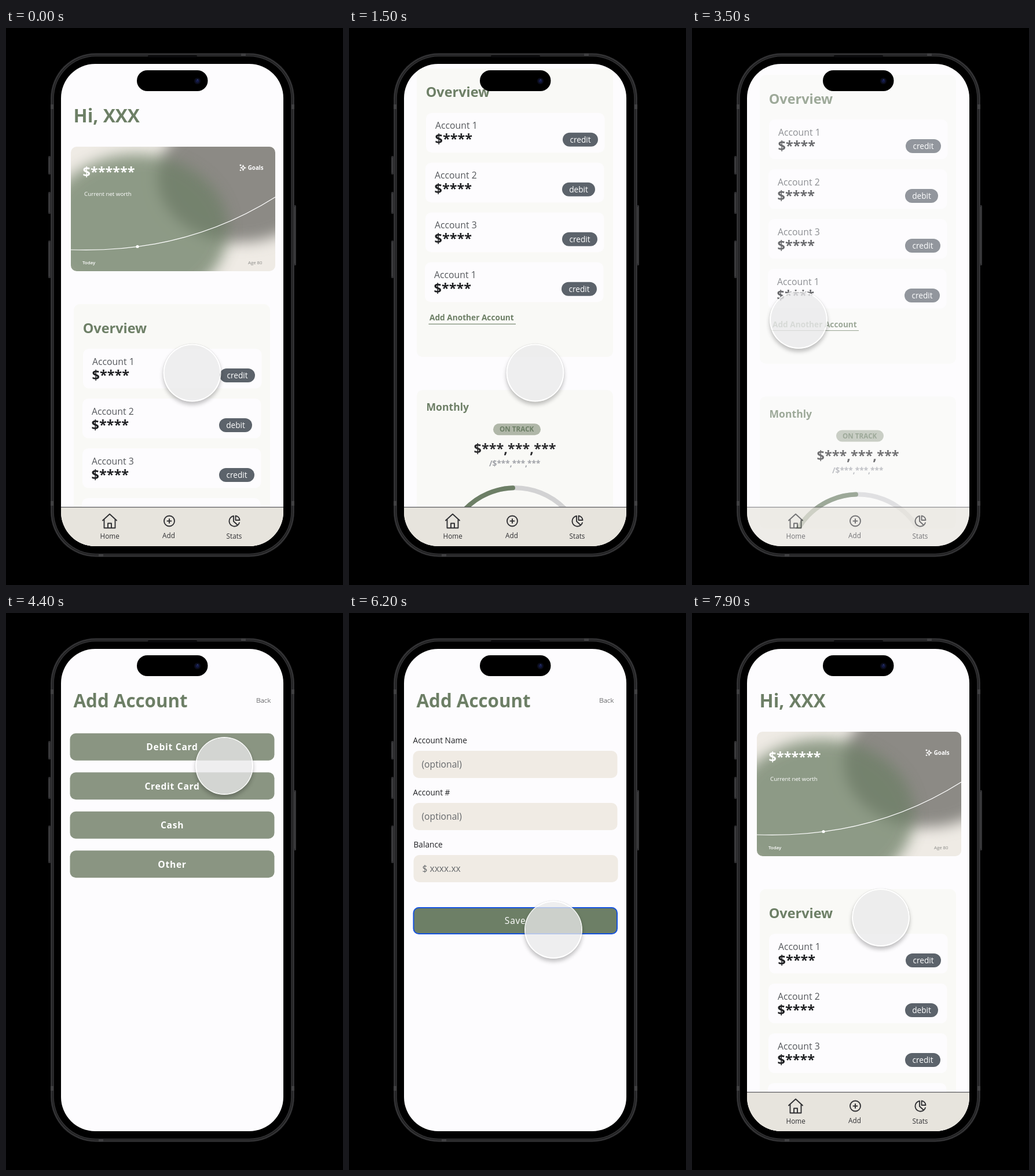
Animation of 582x962 px, one loop 8000 ms. Source, as an HTML page:

```html
<!DOCTYPE html>
<html lang="en">
<head>
<meta charset="utf-8">
<title>Account app walkthrough</title>
<style>
  html, body { margin: 0; width: 100%; height: 100%; overflow: hidden; background: #000; }
  svg { position: absolute; left: 0; top: 0; font-family: "Open Sans", sans-serif; }
  #cursor {
    position: absolute; left: -50px; top: -50px; width: 100px; height: 100px;
    box-sizing: border-box; border: 2px solid rgba(255, 255, 255, .9); border-radius: 50%;
    background: rgba(233, 233, 235, .77); background-clip: padding-box;
    box-shadow: 0 5px 7px rgba(0, 0, 0, .24), 0 0 1px rgba(0, 0, 0, .3);
  }
</style>
</head>
<body>
<svg width="582" height="962" viewBox="0 0 582 962">
  <defs>
    <clipPath id="screenClip"><rect x="95" y="62" width="384" height="833" rx="59"/></clipPath>
    <clipPath id="cardClip"><rect x="112" y="205" width="353" height="215" rx="10"/></clipPath>
    <clipPath id="monthlyClip"><rect x="117" y="1032.5" width="339" height="228" rx="10"/></clipPath>
    <filter id="blur" x="-30%" y="-30%" width="160%" height="160%"><feGaussianBlur stdDeviation="12"/></filter>
  </defs>
  <g id="phone"></g>
  <g clip-path="url(#screenClip)">
    <rect x="95" y="62" width="384" height="833" fill="#fdfcfe"/>
    <g id="home"><g id="scroller"></g></g>
    <g id="nav"></g>
    <g id="header"></g>
    <g id="types"></g>
    <g id="form"></g>
  </g>
  <g id="island"></g>
</svg>
<div id="cursor"></div>
<script>
const LOOP = 8000;
const GREEN = '#6d7f66';
const el = id => document.getElementById(id);

// Markup helpers
const rect = (x, y, w, h, r, fill, extra = '') =>
  `<rect x="${x}" y="${y}" width="${w}" height="${h}" rx="${r}" fill="${fill}" ${extra}/>`;
const text = (x, y, size, weight, fill, str, extra = '') =>
  `<text x="${x}" y="${y}" font-size="${size}" font-weight="${weight}" fill="${fill}" ${extra}>${str}</text>`;
const centered = (x, y, size, weight, fill, str, extra = '') =>
  text(x, y, size, weight, fill, str, 'text-anchor="middle" ' + extra);

function phone() {
  const shell = (inset, fill) =>
    rect(77 + inset, 43.5 + inset, 421 - 2 * inset, 870 - 2 * inset, 78 - inset, fill);
  const button = (x, y, h) => rect(x, y, 4, h, 1.5, '#303032') + rect(x + 1, y + 3, 1, h - 6, 0, '#48484a');
  const seam = (x, y, w, h) => rect(x, y, w, h, 0, '#404042');
  return button(73, 221, 32) + button(73, 283, 38) + button(73, 367, 65) + button(497, 306, 104) +
    shell(0, '#2a2a2c') + shell(1.2, '#39393b') + shell(2.6, '#1d1d1e') + shell(4, '#303032') + shell(5.8, '#000') +
    [132, 817].map(y => seam(77, y, 5, 8) + seam(493, y, 5, 8)).join('') +
    seam(406, 44, 8, 4) + seam(160, 909, 8, 4) + rect(245, 47, 85, 3.5, 1.7, '#0b0b0c');
}

function island() {
  return rect(226, 73, 122.5, 36, 18, '#000') +
    '<circle cx="330.5" cy="91.5" r="5.5" fill="#0b0d1c"/>' +
    '<circle cx="330.5" cy="91.5" r="3" fill="#141a45"/>' +
    '<circle cx="331" cy="89.5" r="1" fill="#34407c"/>';
}

function worthCard() {
  return `<g clip-path="url(#cardClip)">${rect(112, 205, 353, 215, 0, '#efebe5')}
    <ellipse cx="404" cy="258" rx="142" ry="112" fill="#8c8a85" filter="url(#blur)"/>
    <ellipse cx="225" cy="348" rx="159" ry="130" fill="${GREEN}" opacity=".75" filter="url(#blur)"/>
    <path d="M112 383Q310 390 465 292" fill="none" stroke="#fff" stroke-width="1.2"/>
    <circle cx="227" cy="377.5" r="2.6" fill="#fff"/></g>
    <g fill="none" stroke="#fff" stroke-width="1.3" stroke-linejoin="round">
    <path d="M409.500 237L410.700 240.300L414 241.500L410.700 242.700L409.500 246L408.300 242.700L405 241.500L408.300 240.300Z"/>
    <path d="M405 235.500V238.500M403.500 237H406.500M405 244.500V247M403.700 245.700H406.300"/></g>` +
    text(132.500, 257, 23.45, 700, '#fff', '$******') +
    text(135, 290, 9.77, 400, '#fff', 'Current net worth') +
    text(417.800, 245, 9.77, 700, '#fff', 'Goals') +
    text(132, 408.300, 7.8, 600, '#fff', 'Today') +
    text(418, 408.300, 7.8, 400, '#8b8b88', 'Age 80');
}

function accountRow(index, label, kind, shift, pillWidth) {
  const y = 554 + index * 86;
  const x = 133 - shift;
  return rect(x, y, 308.500, 68.500, 10, '#fdfcfe') +
    text(x + 16, y + 27.500, 15.8, 400, '#55585c', label) +
    text(x + 15.500, y + 53.500, 23.45, 700, '#1f2023', '$****') +
    rect(x + 236, y + 34, pillWidth, 24, 12, '#5c636b') +
    centered(x + 236 + pillWidth / 2, y + 50.800, 13.7, 400, '#fff', kind);
}

function overview() {
  return rect(117, 477, 339, 498.500, 10, '#f9f9f6') +
    text(132.700, 526.500, 23.45, 700, GREEN, 'Overview') +
    accountRow(0, 'Account 1', 'credit', 0, 61) +
    accountRow(1, 'Account 2', 'debit', 1, 57) +
    accountRow(2, 'Account 3', 'credit', 1, 61) +
    accountRow(3, 'Account 1', 'credit', 2, 61) +
    text(139, 912.700, 13.68, 700, GREEN, 'Add Another Account') +
    rect(137.500, 918, 150.500, 1.1, 0, GREEN);
}

function monthly() {
  return rect(117, 1032.500, 339, 228, 10, '#f9f9f6') +
    text(133.500, 1068.500, 17.6, 700, GREEN, 'Monthly') +
    rect(249, 1090.500, 82, 20, 10, '#b0b7a8') +
    centered(289.700, 1104.700, 11.7, 700, GREEN, 'ON TRACK') +
    centered(286.500, 1142.500, 23.45, 700, '#2b2b2d', '$***,***,***') +
    centered(286.200, 1164.500, 13.68, 700, '#a0a2a8', '/$***,***,***') +
    `<g clip-path="url(#monthlyClip)" fill="none" stroke-width="8">
    <path d="M167 1321.500A120 120 0 0 1 407 1321.500" stroke="#d2d2d3"/>
    <path d="M167 1321.500A120 120 0 0 1 283 1201.560" stroke="${GREEN}" stroke-linecap="round"/></g>`;
}

function nav() {
  return rect(95, 827.500, 384, 68, 0, '#e7e4dd') + rect(95, 827, 384, 1.2, 0, '#55555a') +
    `<g fill="none" stroke="#303033" stroke-width="1.9" stroke-linejoin="round" stroke-linecap="round">
    <path d="M167 850.500L179 839.500L191 850.500M169.500 848.500V863.500H188.500V848.500M176 863V855.500H182V863"/>
    <circle cx="282" cy="851.500" r="9"/><path d="M282 848V855M278.500 851.500H285.500"/>
    <path d="M393 842.800A9 9 0 1 0 403 854.500M393 842.800V852L400 858.500"/>
    <path d="M396.500 842.500A8 8 0 0 1 403.500 850H396.500Z"/></g>` +
    centered(179.200, 882, 11.72, 400, '#303033', 'Home') +
    centered(281, 880.800, 11.72, 400, '#303033', 'Add') +
    centered(394, 882, 11.72, 400, '#303033', 'Stats');
}

const SPACED = 'letter-spacing=".7"';

function types() {
  return ['Debit Card', 'Credit Card', 'Cash', 'Other'].map((name, i) =>
    rect(110.500, 207.700 + i * 67.5, 353, 47, 10, '#8a9582') +
    centered(287, 237 + i * 67.5, 15.63, 700, '#fff', name, SPACED)).join('');
}

function field(x, y, label, hint) {
  return text(x, y - 13, 13.68, 400, '#1f2023', label) +
    rect(x, y, 353, 47, 10, '#f0ebe4') +
    text(x + 15, y + 29.300, 15.63, 400, '#66696c', hint);
}

function form() {
  return field(110.500, 238, 'Account Name', '(optional)') +
    field(110.500, 328, 'Account #', '(optional)') +
    field(111.500, 418, 'Balance', '$ xxxx.xx') +
    rect(111.500, 509, 351.500, 45, 9, GREEN, 'stroke="#1552e0" stroke-width="2"') +
    centered(287.200, 537.300, 15.63, 400, '#fff', 'Save', SPACED);
}

el('phone').innerHTML = phone();
el('island').innerHTML = island();
el('scroller').innerHTML = text(116.500, 163, 31.6, 700, GREEN, 'Hi, XXX') + worthCard() + overview() + monthly();
el('nav').innerHTML = nav();
el('header').innerHTML = text(116.500, 163, 31.3, 700, GREEN, 'Add Account') +
  text(432.300, 155.300, 11.72, 300, '#1f2023', 'Back');
el('types').innerHTML = types();
el('form').innerHTML = form();

// Motion
const ramp = (t, start, end) => Math.min(1, Math.max(0, (t - start) / (end - start)));
const easeInOut = p => p < .5 ? 4 * p ** 3 : 1 - 4 * (1 - p) ** 3;

// Each key is [time, ...values]; values ease from one key to the next.
function track(keys, t) {
  const next = keys.findIndex(key => key[0] > t);
  const [from, to] = [keys[next - 1], keys[next]];
  const p = easeInOut(ramp(t, from[0], to[0]));
  return from.slice(1).map((value, i) => value + (to[i + 1] - value) * p);
}

const scrollKeys = [[0, 0], [720, 0], [1800, 445], [2150, 445], [2950, 396], [6950, 396], [7850, 0], [LOOP, 0]];
const cursorKeys = [
  [0, 321.5, 595.5], [2600, 321.5, 595.5], [3200, 184, 504], [4100, 184, 504],
  [4400, 377, 264], [4900, 364, 242], [5650, 364, 242], [6200, 353, 547],
  [6500, 326, 526], [LOOP, 326, 526]
];

function setOpacity(id, value) {
  el(id).setAttribute('opacity', value);
  el(id).style.display = value > 0 ? '' : 'none';
}

function draw(t) {
  const leaveForm = ramp(t, 6400, 6700);
  const homeOpacity = 1 - ramp(t, 3400, 3700) + ramp(t, 6600, 6900);
  const addOpacity = ramp(t, 3600, 3900);
  setOpacity('home', homeOpacity);
  setOpacity('nav', homeOpacity);
  setOpacity('header', addOpacity - leaveForm);
  setOpacity('types', addOpacity - ramp(t, 5150, 5450));
  setOpacity('form', ramp(t, 5350, 5700) - leaveForm);

  const [scroll] = track(scrollKeys, t);
  el('scroller').setAttribute('transform', `translate(0 ${-scroll})`);
  const [x, y] = track(cursorKeys, t);
  el('cursor').style.transform = `translate(${x}px, ${y}px)`;
}

const startTime = performance.now();
function tick() {
  draw((performance.now() - startTime) % LOOP);
  requestAnimationFrame(tick);
}
tick();
</script>
</body>
</html>
```
